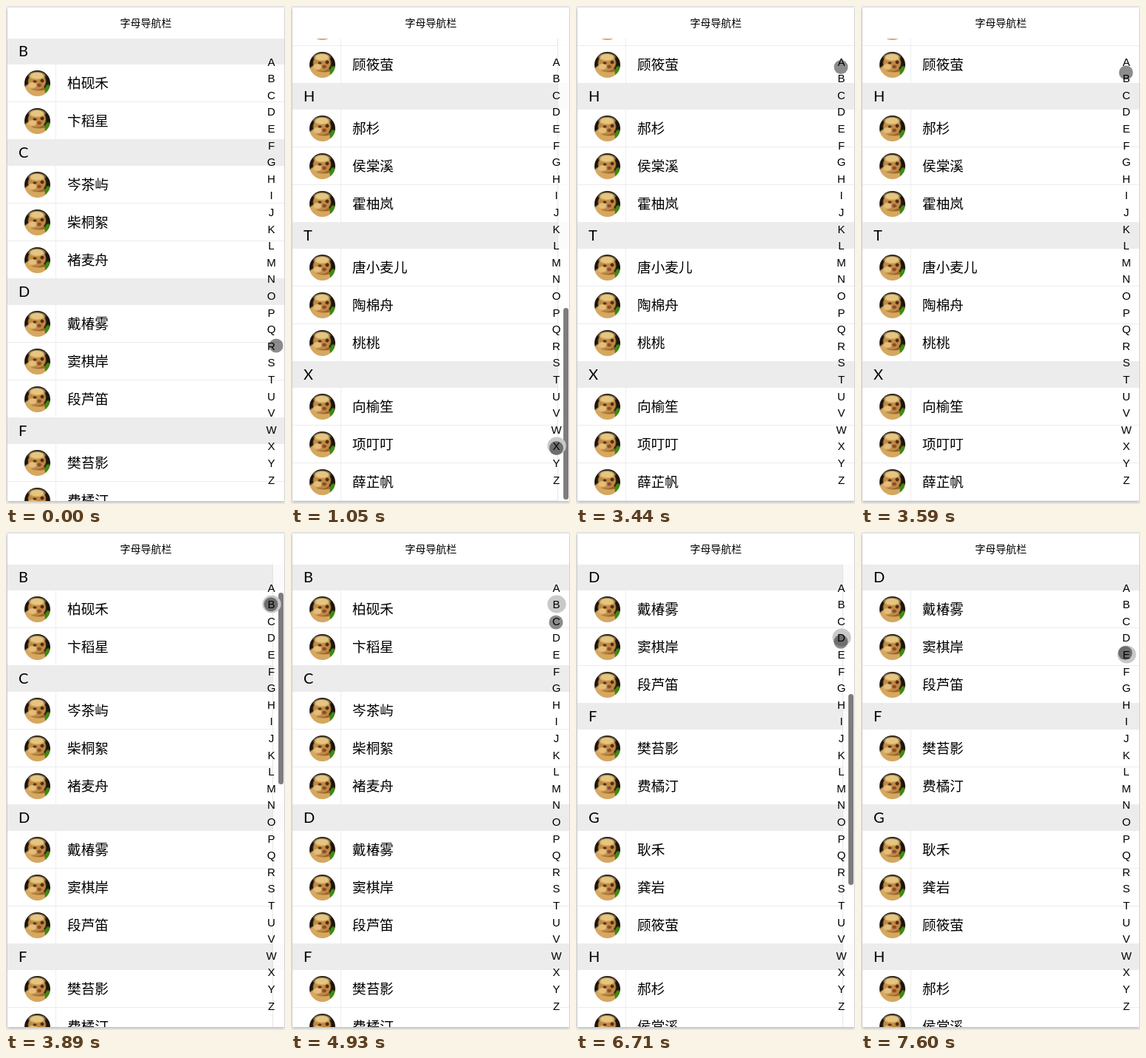
An HTML page that plays this animation: 378 px wide and 673 px high, repeating every 8000 ms.

```html
<!DOCTYPE html>
<html lang="zh-CN">
<head>
<meta charset="utf-8">
<title>字母导航栏</title>
<style>
  html, body { margin: 0; width: 100%; height: 100%; overflow: hidden; background: #eee; }
  body { position: relative; color: #000; font-family: "Noto Sans CJK SC", sans-serif; }
  body > *, .row > *, #bar > * { position: absolute; }
  #page { left: 2px; top: 2px; width: 375px; height: 667px; background: #fff; box-shadow: 0 1px 4px rgba(0,0,0,.3); }
  #title { left: 2px; top: 2px; width: 375px; font-size: 14px; line-height: 41px; text-align: center; }
  #view { left: 2px; top: 44px; width: 375px; height: 625px; overflow: hidden; }
  .head { height: 35px; padding-left: 15px; background: #ececec; font: 20px/32px Lato, sans-serif; }
  .row { position: relative; box-sizing: border-box; height: 51px; border-bottom: 1px solid #ececec; }
  .row i { left: 65px; width: 1px; height: 50px; background: #eee; }
  .row span { left: 81px; font-size: 18.7px; line-height: 47px; white-space: nowrap; }
  .row b {
    left: 23px; top: 8px; width: 35px; height: 35px; border-radius: 50%;
    background:
      radial-gradient(ellipse 3px 2px at 14px 15px, #5a3518 60%, transparent),
      radial-gradient(ellipse 3px 3px at 24px 14px, #4e2d15 60%, transparent),
      radial-gradient(ellipse 4px 3px at 20px 20px, #8a4a2c 50%, transparent),
      radial-gradient(ellipse 5px 9px at 32px 27px, #3f8a10 70%, transparent),
      radial-gradient(ellipse 13px 6px at 17px 7px, #e6c580 60%, transparent),
      radial-gradient(ellipse 7px 5px at 11px 20px, #e3bd7c 60%, transparent),
      radial-gradient(ellipse 13px 12px at 17px 15px, #c08a42 85%, transparent),
      radial-gradient(ellipse 12px 3px at 20px 25px, #93602a 50%, transparent),
      radial-gradient(ellipse 17px 14px at 13px 30px, #d6a75f 85%, transparent),
      #1d150c;
  }
  #bar { left: 361px; top: 44px; width: 16px; height: 625px; }
  #track { inset: 0; border-left: 1px solid #e4e4e4; background: rgba(255,255,255,.8); }
  #thumb { left: 8px; width: 7px; border-radius: 4px; background: #7d7d7d; }
  #index { left: 347.5px; top: 63.7px; width: 24px; font: 15px/24.6px "Liberation Sans", Arial, sans-serif; text-align: center; }
  #index div { height: 22.6px; border-radius: 50%; }
  #index .on { background: #c9c9c9; box-shadow: 0 0 0 .6px #c9c9c9; }
  #pointer { left: -9.5px; top: -9.5px; width: 19px; height: 19px; border-radius: 50%; background: rgba(0,0,0,.45); }
</style>
</head>
<body>
<div id="page"></div>
<div id="title">字母导航栏</div>
<div id="view"><div id="list"></div></div>
<div id="bar"><div id="track"></div><div id="thumb"></div></div>
<div id="index"></div>
<div id="pointer"></div>
<script>
const $ = id => document.getElementById(id);
const LOOP = 8000, TICK = 148.9;
const HEAD = 35, ROW = 51, VIEW = 625;

const contacts = {
  A: "敖葵", B: "柏砚禾 卞稻星", C: "岑茶屿 柴桐絮 褚麦舟", D: "戴椿雾 窦棋岸 段芦笛",
  F: "樊苔影 费橘汀", G: "耿禾 龚岩 顾筱萤", H: "郝杉 侯棠溪 霍柚岚",
  T: "唐小麦儿 陶棉舟 桃桃", X: "向榆笙 项叮叮 薛芷帆"
};

// [tick, section scrolled to]
const jumps = [[-99, "B"], [7, "X"], [26, "B"], [35, "C"], [42, "D"]];
// [tick, highlighted letter]
const marks = [[0, ""], [7, "X"], [10, ""], [26, "B"], [35, "C"], [42, "D"], [51, "E"]];
// [tick, x, y]
const path = [
  [0, 365.5, 458.5], [5, 358.5, 599.5], [6, 358.5, 599.5], [7, 359, 597],
  [13, 358.5, 111.5], [18, 358.5, 75.5], [21, 358.5, 75.5], [23, 358.5, 82],
  [25, 358.5, 97], [28, 358.5, 97.5], [33, 358.5, 121.5], [38, 358.5, 121.5],
  [41, 358.5, 138.5], [42, 358.5, 144], [44, 358.5, 144], [49, 357.5, 163], [54, 357.5, 163]
];

const offsets = {};
let total = 0;
for (const [letter, names] of Object.entries(contacts)) {
  const rows = names.split(" ");
  offsets[letter] = total;
  total += HEAD + ROW * rows.length;
  $("list").innerHTML += `<div class="head">${letter}</div>` +
    rows.map(name => `<div class="row"><b></b><i></i><span>${name}</span></div>`).join("");
}
$("index").innerHTML = [..."ABCDEFGHIJKLMNOPQRSTUVWXYZ"].map(c => `<div>${c}</div>`).join("");
const letters = [...$("index").children];

const latest = (events, tick) => events.filter(e => e[0] <= tick).pop();

function pointerAt(tick) {
  const i = Math.max(1, path.findIndex(p => p[0] >= tick));
  const [t0, x0, y0] = path[i - 1], [t1, x1, y1] = path[i];
  const k = (tick - t0) / (t1 - t0);
  return [x0 + (x1 - x0) * k, y0 + (y1 - y0) * k];
}

function draw(now) {
  const tick = Math.floor(now % LOOP / TICK);
  const [jumpTick, section] = latest(jumps, tick);
  const scroll = Math.min(offsets[section], total - VIEW);
  $("list").style.transform = `translateY(${-scroll}px)`;

  $("bar").style.opacity = Math.max(0, Math.min(1, (5 - tick + jumpTick) / 2));
  $("thumb").style.top = scroll / total * VIEW + 2 + "px";
  $("thumb").style.height = VIEW * VIEW / total - 4 + "px";

  const mark = latest(marks, tick)[1];
  letters.forEach(el => el.className = el.textContent === mark ? "on" : "");

  const [x, y] = pointerAt(tick);
  $("pointer").style.transform = `translate(${x}px, ${y}px)`;
}

const start = performance.now();
function loop() {
  draw(performance.now() - start);
  requestAnimationFrame(loop);
}
loop();
</script>
</body>
</html>
```
